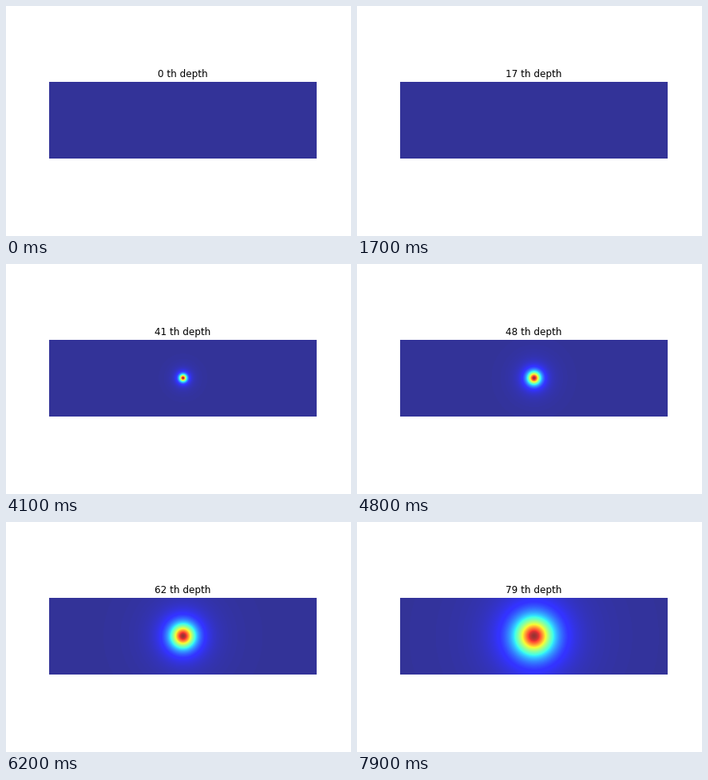
A matplotlib script for the animation above (8000 ms loop, 432 by 288 pixels).

```python
import numpy as np
import matplotlib.pyplot as plt
from matplotlib.animation import FuncAnimation

W, H, DPI = 432, 288, 72
LEFT, TOP, COLS, ROWS = 54, 95, 335, 96
FRAMES, STEP_MS = 80, 100

plt.rcParams["font.family"] = "DejaVu Sans"
fig = plt.figure(figsize=(W / DPI, H / DPI), dpi=DPI, facecolor="white")
ax = fig.add_axes([LEFT / W, 1 - (TOP + ROWS) / H, COLS / W, ROWS / H])
ax.axis("off")

yy, xx = np.mgrid[:ROWS, :COLS]
r2 = (xx - 167.2) ** 2 + (yy - 47.2) ** 2


def spread(depth):
    """Core radius: almost nothing at first, then a steady linear growth."""
    soft = 3.0
    return 0.53 * soft * np.log1p(np.exp((depth - 32) / soft))


def field(depth):
    return (1 + r2 / spread(depth) ** 2) ** -1.5


img = ax.imshow(field(0), cmap="jet", vmin=0, vmax=1, alpha=0.8,
                interpolation="nearest", aspect="auto")
title = fig.text(221.4 / W, 1 - 89.4 / H, "", fontsize=12,
                 ha="center", va="baseline")


def draw(depth):
    img.set_data(field(depth))
    title.set_text(f"{depth} th depth")
    return img, title


anim = FuncAnimation(fig, draw, frames=FRAMES, interval=STEP_MS,
                     repeat=True, repeat_delay=0, blit=False)
plt.show()
```
